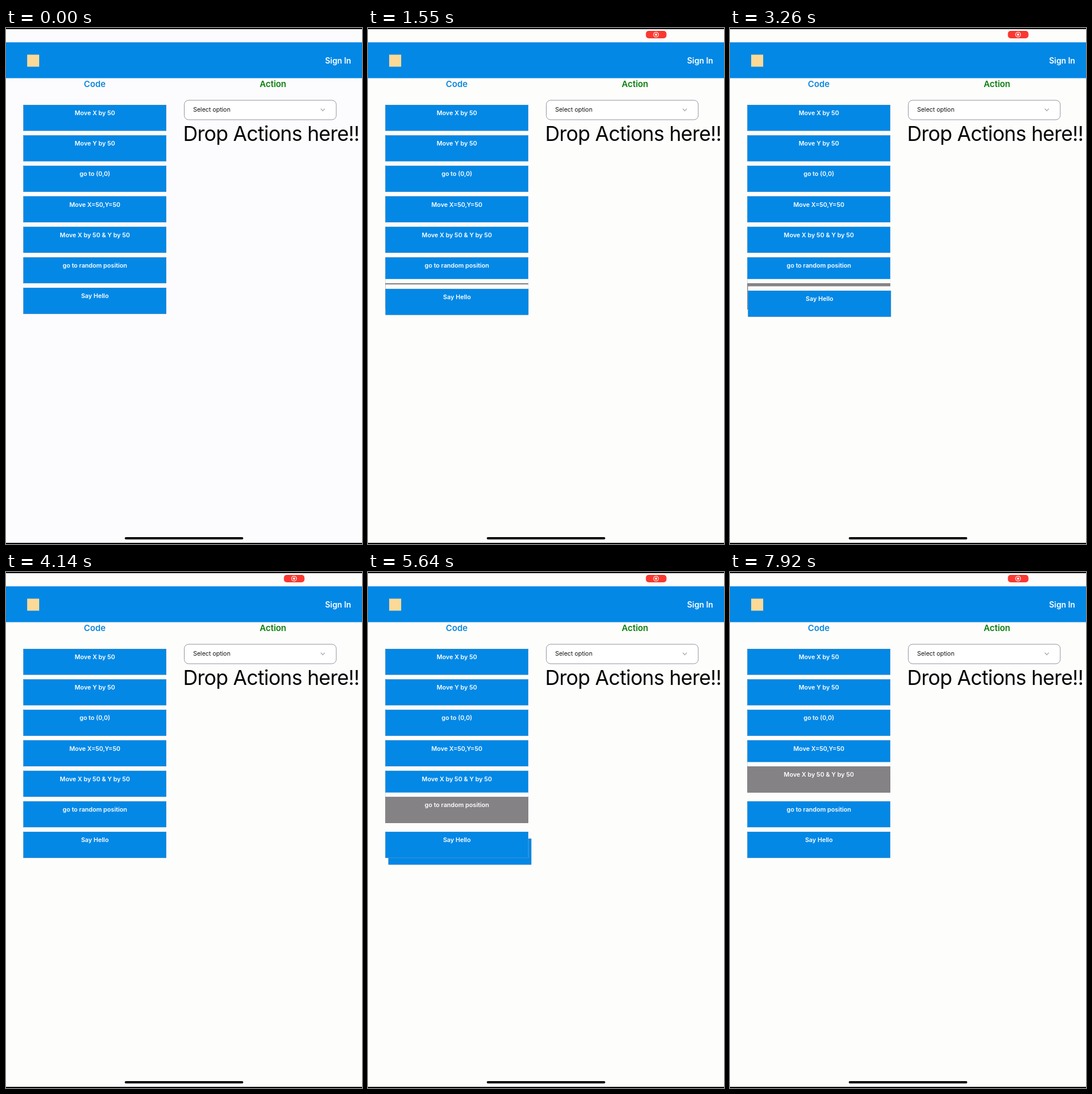
An HTML page for the animation above (8 s loop, 622 by 900 pixels).

```html
<!DOCTYPE html>
<html lang="en">
<head>
<meta charset="utf-8">
<title>Block editor</title>
<style>
  html, body { margin: 0; width: 100%; height: 100%; overflow: hidden; }
  svg { display: block; width: 622px; height: 900px; font-family: Inter, Roboto, sans-serif; --page: #fdfdfc; }
  .page { fill: var(--page); }
  .bar { fill: #0388e6; }
  .block { fill: #0388e6; stroke: #2476b4; stroke-width: .6; }
  .held .block { fill: #848284; stroke: #5f5f63; }
  .label { fill: #fff; font-size: 10.7px; font-weight: 600; text-anchor: middle; }
  .heading { font-size: 14.8px; font-weight: 600; text-anchor: middle; }
</style>
</head>
<body>
<svg viewBox="0 0 622 900">
  <rect class="page" width="622" height="900"/>
  <rect width="622" height="2"/>
  <rect y="898" width="622" height="2"/>
  <g id="recording">
    <rect x="485.5" y="5" width="36" height="13" rx="5" fill="#fa3830"/>
    <circle cx="503.3" cy="11.5" r="4.3" fill="none" stroke="#fff" stroke-width="1.1"/>
    <circle cx="503.3" cy="11.5" r="1.9" fill="#fff"/>
  </g>
  <rect class="bar" y="25" width="622" height="62.5"/>
  <rect x="37" y="46.5" width="21" height="21" fill="#fcd997"/>
  <text x="603" y="62" fill="#fff" font-size="13.8" font-weight="600" text-anchor="end">Sign In</text>
  <text class="heading" x="155" y="102.5" fill="#0a86dc">Code</text>
  <text class="heading" x="466.5" y="102.5" fill="#087c0a">Action</text>
  <rect x="311.5" y="126" width="265.5" height="34" rx="7.5" fill="#fff" stroke="#858a98" stroke-width=".9"/>
  <text x="327" y="146" font-size="10.5" fill="#111">Select option</text>
  <path d="M550 140.8l3.5 3.7 3.5-3.7" fill="none" stroke="#a5abb5" stroke-width="1.3"/>
  <text x="309.5" y="197" font-size="35.3" letter-spacing="-.02em" fill="#050505">Drop Actions here!!</text>
  <g id="list"></g>
  <rect x="207.5" y="888" width="207" height="4" rx="2"/>
</svg>
<script>
const LOOP = 8000, RECORDING_AT = 300;
const TOP = 134, PITCH = 53.17, GAP = 7.6;
const labels = ["Move X by 50", "Move Y by 50", "go to (0,0)", "Move X=50,Y=50",
  "Move X by 50 & Y by 50", "go to random position", "Say Hello"];

// path: [time, dx, dy] of the block under the finger
const drags = [
  { item: 6, from: 1350, to: 3370, path: [[1500, 0, 0], [2300, 18.6, 160], [2350, 18.6, 160], [3370, .6, 0]] },
  { item: 5, from: 4150, to: 6690, path: [[4300, 0, 0], [5000, 9.2, 172], [5100, 9.2, 172], [5900, 4, 30], [6620, 1.1, 7.2], [6690, 1, 6.5]] },
  { item: 4, from: 7830, to: LOOP, path: [] }
];

const svg = document.querySelector("svg");
const list = document.getElementById("list");
const recording = document.getElementById("recording");

function add(parent, tag, attrs, text = "") {
  const node = document.createElementNS("http://www.w3.org/2000/svg", tag);
  for (const key in attrs) node.setAttribute(key, attrs[key]);
  node.textContent = text;
  return parent.appendChild(node);
}

function addBlock(label) {
  const group = add(list, "g", {});
  add(group, "rect", { class: "page", x: 30.3, y: -GAP, width: 249.9, height: PITCH });
  add(group, "rect", { class: "block", x: 30.6, y: .3, width: 249.2, height: 45 });
  add(group, "text", { class: "label", x: 155.3, y: 18 }, label);
  return group;
}

const place = (node, x, y) => node.setAttribute("transform", `translate(${x} ${y})`);
const show = (node, visible) => { node.style.display = visible ? "" : "none"; };
const rows = labels.map(label => ({ slot: addBlock(label), ghost: addBlock(label) }));

function offsetAt(path, time) {
  const next = path.findIndex(step => step[0] > time);
  if (next < 1) return null;
  const a = path[next - 1], b = path[next];
  const u = (time - a[0]) / (b[0] - a[0]);
  const ease = u * u * (3 - 2 * u);
  return [1, 2].map(k => a[k] + (b[k] - a[k]) * ease);
}

function draw(time) {
  show(recording, time >= RECORDING_AT);
  svg.style.setProperty("--page", time < RECORDING_AT ? "#fcfcfe" : "#fdfdfc");
  rows.forEach(({ slot, ghost }, i) => {
    const drag = drags.find(d => d.item === i && time >= d.from && time < d.to);
    const offset = drag && offsetAt(drag.path, time);
    const y = TOP + i * PITCH;
    slot.classList.toggle("held", !!drag);
    place(slot, 0, drag ? y - GAP : y);
    show(ghost, offset);
    if (offset) place(ghost, offset[0], y + offset[1]);
  });
}

const start = performance.now();
function tick() {
  draw((performance.now() - start) % LOOP);
  requestAnimationFrame(tick);
}
tick();
</script>
</body>
</html>
```
